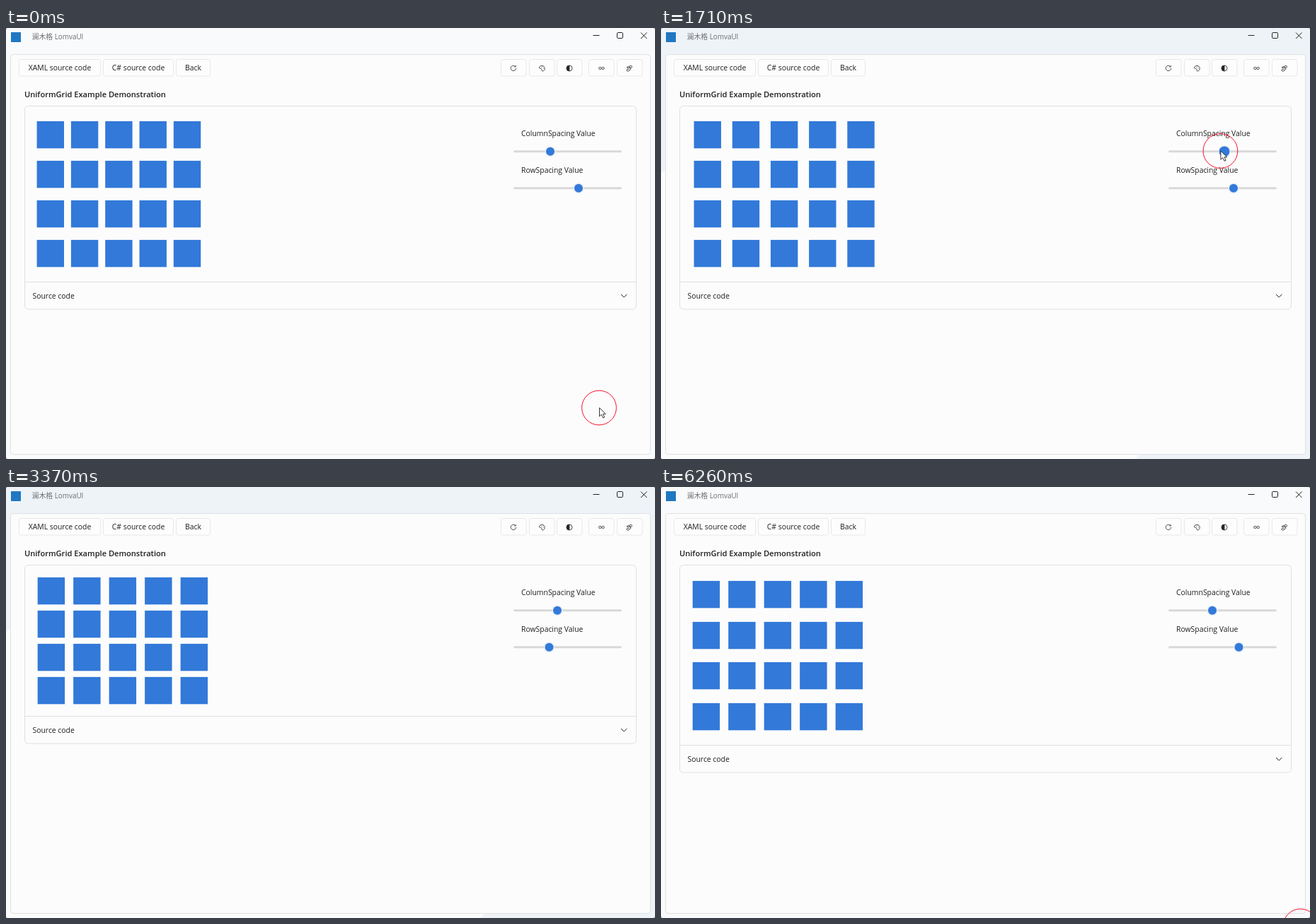
These frames come from a looping animation (917 by 610 pixels, 6.33 s). An HTML page:

```html
<!DOCTYPE html>
<html lang="en">
<head>
<meta charset="utf-8">
<title>UniformGrid demo</title>
<style>
  html, body { margin: 0; width: 100%; height: 100%; overflow: hidden; background: #8b949c; }
  svg { display: block; width: 917px; height: 610px; }
  text { font: 10.4px "Open Sans", "Noto Sans", "Noto Sans CJK SC", sans-serif; fill: #1f1f1f; }
  .head { font-size: 11.1px; font-weight: 600; }
  .title { font-size: 9.9px; fill: #6e6e6e; }
  .box { fill: none; stroke: #e0e0e0; }
  .btn rect { fill: #fdfdfd; stroke: #e8e8e8; }
  .line { fill: none; stroke: #222; }
  .icon { fill: none; stroke: #3a3a3a; stroke-width: .9; }
  .track { stroke: #d9d9d9; stroke-width: 3; stroke-linecap: round; }
  .blue { fill: #3279d9; }
</style>
</head>
<body>
<svg viewBox="0 0 917 610">
  <rect id="back" width="917" height="610" rx="3" fill="#f9fafb"/>
  <path id="pale" d="M0 205L7 200V603H677L670 610H3Q0 610 0 607Z" fill="#fbfcfc"/>
  <rect x="7" y="6" width="14" height="14" fill="#1f78c1"/>
  <text class="title" x="36.5" y="16.3">澜木格 LomvaUI</text>
  <g class="line">
    <path d="M829.5 10.5h9M897 6.5l8.5 8.5M905.5 6.5l-8.5 8.5"/>
    <rect x="863.5" y="6.5" width="8" height="8" rx="1.2"/>
  </g>
  <rect class="box" x="6.5" y="37.5" width="904" height="566" rx="4" style="fill:#fcfcfc"/>
  <g class="btn" id="buttons"></g>
  <g class="icon">
    <path d="M719.6 54.4a3.7 3.7 0 1 0 1 2.6M720.2 53v2h-2"/>
    <path d="M753.4 56.2c1-3.6 6-4 7.500-.6 1 2.600-.4 5.600-2.800 5.400-2-.2-.4-2.400-1.600-3.200-1.200-.8-2.800.2-3.100-1.600zM756 55.600h.8M758 55h.8M759 57.200h.6"/>
    <circle cx="796" cy="57" r="4"/>
    <path d="M796 53a4 4 0 0 0 0 8z" fill="#222"/>
    <circle cx="839.400" cy="57" r="1.700"/><circle cx="843.600" cy="57" r="1.700"/>
    <rect x="881" y="53.500" width="3.500" height="2.500" rx="1"/>
    <rect x="877" y="58.500" width="3.500" height="2.500" rx="1"/>
    <path d="M881 54.700h-2q-2 0-1.500 1.800h5q1.500 2-1.500 3.200"/>
  </g>
  <text class="head" x="26" y="98">UniformGrid Example Demonstration</text>
  <rect id="card" class="box" x="26.5" y="110.5" width="864" rx="5"/>
  <g id="grid" class="blue"></g>
  <g id="foot">
    <path class="box" d="M26.5 0h864"/>
    <text x="37.5" y="23">Source code</text>
    <path class="line" d="M869 17.500l4.200 4 4.200-4"/>
  </g>
  <text x="728" y="152.600">ColumnSpacing Value</text>
  <text x="728" y="204.600">RowSpacing Value</text>
  <path class="track" d="M718.500 174.800h150M718.500 226.800h150"/>
  <g id="knobs"></g>
  <g id="pointer">
    <circle r="24.400" fill="none" stroke="#f8102a"/>
    <path d="M.5 0V12.200L3.400 9.500 5.600 14.300 7.700 13.400 5.600 8.700H9.300Z" fill="#fff" stroke="#222" stroke-width=".9"/>
  </g>
</svg>
<script>
const LOOP = 6330, SIZE = 38.4;
const $ = id => document.getElementById(id);

function add(parent, tag, attrs, text) {
  const el = document.createElementNS('http://www.w3.org/2000/svg', tag);
  set(el, attrs);
  if (text) el.textContent = text;
  parent.appendChild(el);
  return el;
}
function set(el, attrs) {
  for (const k in attrs) el.setAttribute(k, attrs[k]);
}

function button(x, width, label) {
  add($('buttons'), 'rect', { x, y: 44.5, width, height: 23.5, rx: 3 });
  if (label) add($('buttons'), 'text', { x: x + width / 2, y: 60, 'text-anchor': 'middle' }, label);
}
button(18.5, 115, 'XAML source code');
button(137.5, 99, 'C# source code');
button(240.5, 48, 'Back');
[699.5, 739.5, 778.5, 823.5, 863.5].forEach(x => button(x, 35.5));

const tiles = Array.from({ length: 20 }, () =>
  add($('grid'), 'rect', { width: SIZE, height: SIZE }));

const knobs = [174.8, 226.8].map(cy => ({
  halo: add($('knobs'), 'circle', { cy, r: 8.5 }),
  dot: add($('knobs'), 'circle', { cy, class: 'blue' })
}));

const linear = p => p;
const smooth = p => p * p * (3 - 2 * p);
const speedUp = p => p * p;

// Each move: first change, last change, number of steps, target, easing
const pointer = [
  [50, 660, 11, [776.5, 176.5], smooth],
  [710, 860, 4, [768.3, 173.5], linear],
  [1060, 1450, 8, [807.5, 174], smooth],
  [1600, 1820, 5, [779, 174], linear],
  [1920, 2180, 6, [800, 212], smooth],
  [2240, 2440, 5, [811, 228], linear],
  [2490, 2910, 9, [770, 228], smooth],
  [3110, 3370, 6, [945, 640], speedUp],
  [3590, 3590, 1, [905.5, 623.5], linear],
  [3690, 3690, 1, [945, 640], linear],
  [4000, 4620, 13, [776.5, 230.5], smooth],
  [4670, 4670, 1, [773.5, 227.7], linear],
  [4720, 5150, 9, [822, 229.5], smooth],
  [5300, 5900, 10, [905, 618], smooth],
  [5950, 5950, 1, [905.5, 619.5], linear],
  [6000, 6000, 1, [945, 640], linear],
  [6160, 6160, 1, [904, 623], linear],
  [6260, 6260, 1, [903.5, 621.5], linear]
];
const column = [
  [1060, 1450, 8, [807], smooth],
  [1600, 1900, 7, [779], smooth]
];
const row = [
  [2490, 2910, 9, [767.5], smooth],
  [4720, 5150, 9, [816.5], smooth]
];

function pose(moves, start, t) {
  let at = start;
  for (const [t0, t1, n, to, ease] of moves) {
    if (t < t0) break;
    const step = n > 1 ? Math.floor((t - t0) / (t1 - t0) * (n - 1) + 1e-6) + 1 : 1;
    const p = ease(Math.min(1, step / n));
    at = at.map((v, i) => v + (to[i] - v) * p);
  }
  return at;
}

const within = (t, ...spans) => spans.some(([a, b]) => t >= a && t < b);

function drawKnob({ halo, dot }, cx, hover, press) {
  set(halo, { cx, r: hover ? 8.5 : press ? 8.7 : 7.5, fill: hover ? '#b4cff3' : '#e6edf6' });
  set(dot, { cx, r: press ? 7.4 : 6 });
}

function draw(t) {
  const [x, y] = pose(pointer, [838, 537.5], t);
  const [cx] = pose(column, [769], t);
  const [rx] = pose(row, [809], t);
  const colPitch = 48.3 + (cx - 769) * .218;
  const rowPitch = 56 + (rx - 809) * .2125;
  const left = 38.65 + (colPitch - SIZE) / 2;
  const top = 123.2 + (rowPitch - SIZE) / 2;
  const split = Math.round(359 + 4 * (rowPitch - 56)) + .5;

  tiles.forEach((tile, i) => set(tile, {
    x: left + i % 5 * colPitch,
    y: Math.round(top + .2 + Math.floor(i / 5) * rowPitch) - .1
  }));
  set($('card'), { height: split + 38.5 - 110.5 });
  set($('foot'), { transform: `translate(0 ${split})` });
  drawKnob(knobs[0], cx, within(t, [760, 1060]), within(t, [1060, 1920]));
  drawKnob(knobs[1], rx, within(t, [2340, 2390], [5150, 5300]), within(t, [2390, 2960], [4720, 5150]));
  set($('pointer'), { transform: `translate(${x} ${y})` });

  const active = within(t, [1060, 6160]);
  set($('back'), { fill: active ? '#eef3f8' : '#f9fafb' });
  set($('pale'), { visibility: active ? 'visible' : 'hidden' });
}

function tick() {
  draw(performance.now() % LOOP);
  requestAnimationFrame(tick);
}
tick();
</script>
</body>
</html>
```
